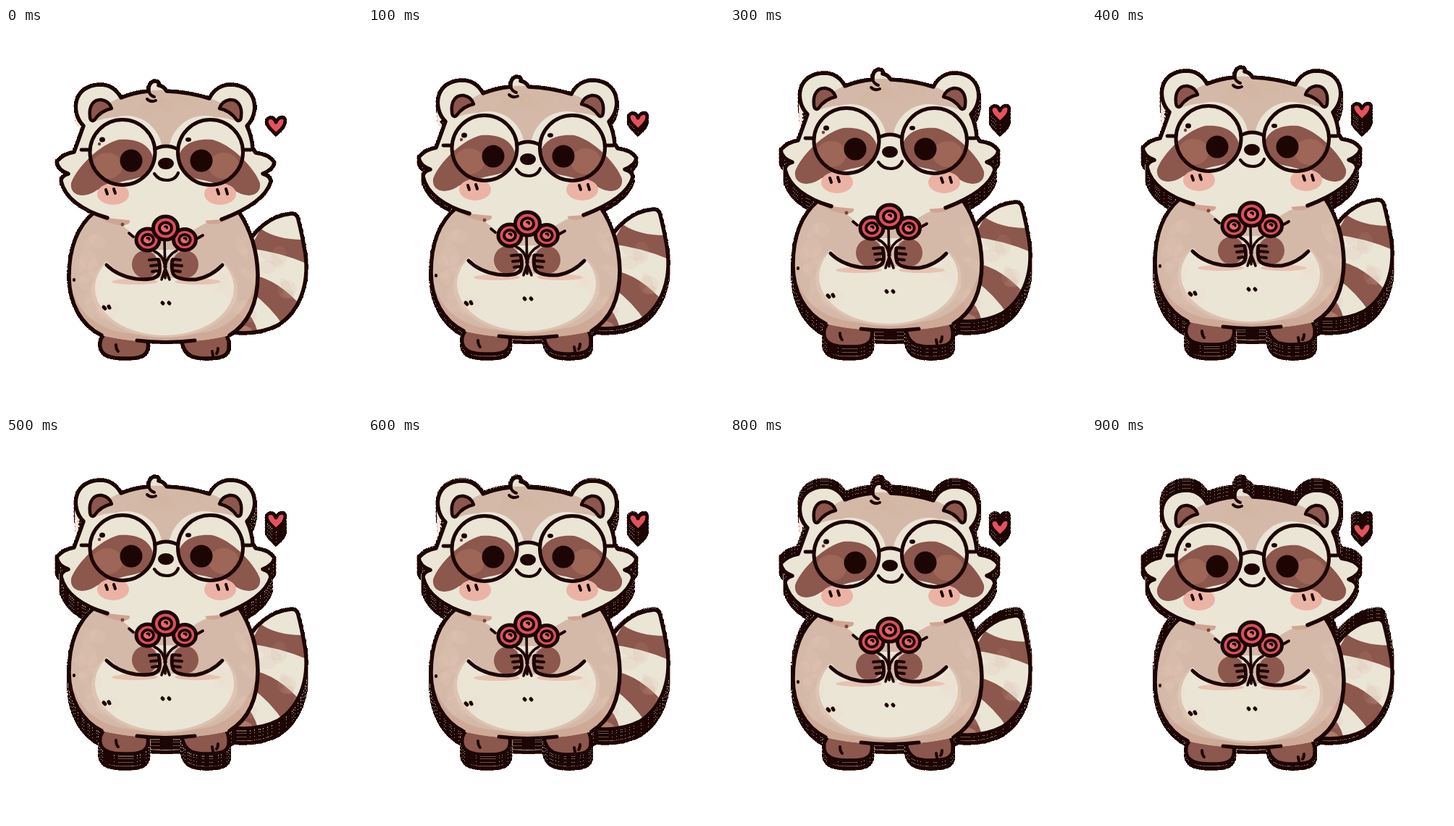
Write an HTML page with a canvas that moves like this. It is 492 px wide and 527 px high and loops after 1 s.

```html
<!DOCTYPE html>
<html lang="en">
<head>
<meta charset="utf-8">
<title>Raccoon with roses</title>
<style>
html, body { margin: 0; width: 100%; height: 100%; overflow: hidden; background: #fff; }
canvas { display: block; }
</style>
</head>
<body>
<canvas id="stage" width="492" height="527"></canvas>
<script>
const W = 492, H = 527;
const INK = '#1c0503', CREAM = '#ebe5d6', TAN = '#d5b9a8', BROWN = '#8c574c',
      LIGHT = '#9d6656', PINK = '#ebb3a4', RED = '#d9505b';

const sprite = document.createElement('canvas');
sprite.width = W;
sprite.height = H;
const g = sprite.getContext('2d', { willReadFrequently: true });
g.lineCap = g.lineJoin = 'round';

function shape(path, fill, line, width = 5) {
  const p = typeof path === 'string' ? new Path2D(path) : path;
  if (fill) { g.fillStyle = fill; g.fill(p); }
  if (line) { g.strokeStyle = line; g.lineWidth = width; g.stroke(p); }
}
const ink = (path, width = 4.5) => shape(path, null, INK, width);

function oval(x, y, rx, ry = rx, tilt = 0) {
  const p = new Path2D();
  p.ellipse(x, y, rx, ry, tilt, 0, Math.PI * 2);
  return p;
}

function within(path, draw) {
  g.save();
  g.clip(typeof path === 'string' ? new Path2D(path) : path);
  draw();
  g.restore();
}

function mirrored(draw) {
  draw();
  g.save();
  g.translate(441, 0);
  g.scale(-1, 1);
  draw();
  g.restore();
}

// Seeded generator for washes and the rough edge
let seed = 7;
function rnd() {
  seed = (seed * 16807) % 2147483647;
  return seed / 2147483647;
}

function wash(x, y, w, h, color, count) {
  g.globalAlpha = 0.12;
  for (let i = 0; i < count; i++) {
    shape(oval(x + rnd() * w, y + rnd() * h, 5 + rnd() * 14, 4 + rnd() * 9, rnd() * 3), color);
  }
  g.globalAlpha = 1;
}

function tail() {
  const p = 'M325 312 C340 282 362 259 394 256 Q402 255 404 264 Q409 284 412 301 C422 350 407 390 376 410 Q349 424 313 420 Z';
  shape(p, CREAM);
  within(p, () => {
    shape('M352 277 Q376 293 414 292 L420 327 Q383 310 337 304 Z', BROWN);
    shape('M338 340 Q376 346 412 388 L384 412 Q366 384 338 364 Z', BROWN);
    shape('M326 384 Q344 400 349 424 L306 424 Z', BROWN);
    shape(oval(318, 418, 22, 9), '#ac7c6d');
    wash(340, 270, 70, 140, '#c9a392', 8);
  });
  ink(p, 5.5);
}

function feet() {
  const left = 'M134 424 Q127 434 131 444 Q136 456 162 456 Q188 457 194 448 Q198 441 196 433';
  const right = 'M243 433 Q245 447 256 453 Q272 458 292 455 Q308 453 308 441 Q309 432 305 424';
  for (const p of [left, right]) shape(p, BROWN, INK, 5.5);
  ink('M152 437 Q152 443 155 446 M285 446 L286 452 M293 442 Q293 447 291 449', 4);
}

function body() {
  const p = 'M122 250 C98 272 87 305 87 343 C87 380 104 410 132 424 Q170 433 220 434 Q272 433 309 424 C335 408 348 380 348 340 C347 305 338 278 322 254 Z';
  shape(p, TAN);
  within(p, () => {
    shape('M87 340 C92 385 120 412 160 420 Q220 430 280 419 Q330 405 348 345 L350 440 L86 440 Z', '#cfa997');
    shape(oval(219, 361, 101, 66), '#dcc2b1');
    shape(oval(219, 359, 96, 65), CREAM);
    shape('M124 300 Q170 285 180 275 L260 275 Q285 290 312 302 Q300 330 270 345 L170 345 Q140 330 124 300', TAN);
    shape('M140 262 Q162 270 176 286 Q220 302 252 284 Q272 268 298 262 Z', CREAM);
    shape(oval(148, 261, 24, 9, 0.3), '#d0a493');
    shape(oval(295, 261, 20, 8, -0.3), '#d0a493');
    shape(oval(178, 350, 32, 4), '#e7c2b1');
    shape(oval(265, 350, 32, 4), '#e7c2b1');
    wash(95, 275, 50, 130, '#e9cfbf', 12);
    wash(295, 275, 45, 120, '#e9cfbf', 12);
  });
  ink('M122 254 C98 274 87 305 87 343 C87 380 104 410 132 424', 5.5);
  ink('M309 424 C335 408 348 380 348 340 C347 305 338 278 322 254', 5.5);
  ink('M181 431 Q220 436 261 431', 5);
}

function ear() {
  shape('M116 123 C114 106 122 98 132 99 Q143 101 146 111 Q131 114 122 127 Q117 130 116 123', BROWN, INK, 4.5);
}

function eyePatch() {
  const p = 'M204 182 C200 161 182 152 156 154 C130 160 98 192 90 214 C88 230 104 236 122 226 C140 214 170 211 188 205 Q204 197 204 182';
  shape(p, BROWN);
  within(p, () => within(oval(161, 171, 44), () => shape(oval(140, 190, 21, 18), LIGHT)));
}

function head() {
  const p = 'M140 262 C105 252 81 234 76 211 Q76 204 86 201 Q71 196 70 184 Q80 173 94 171 Q101 152 107 135 ' +
    'C89 117 92 79 130 78 C144 78 153 85 159 96 Q176 89 197 87 C196 80 200 73 206 73 Q213 74 211 79 Q218 80 222 87 ' +
    'Q252 88 281 97 C287 85 298 78 311 78 C348 79 351 118 333 135 Q340 150 341 166 L345 172 Q363 174 371 185 ' +
    'Q370 195 355 201 Q366 204 366 212 C360 233 335 250 298 264';
  shape(oval(99, 123, 4, 12), '#f4e8df');
  shape(p + ' Q220 272 140 262', CREAM);
  within(p, () => {
    shape('M119 131 Q130 107 158 96 Q180 86 200 86 L222 86 Q258 88 282 97 Q309 106 322 131 ' +
      'Q306 122 283 123 C257 125 238 141 234 164 L209 164 C205 142 187 125 161 123 Q136 122 119 131', TAN);
    mirrored(() => shape(oval(166, 171, 50), CREAM));
    wash(160, 92, 115, 20, '#c9a896', 7);
    mirrored(eyePatch);
  });
  for (const x of [148, 296]) shape(oval(x, 229, 22, 15), PINK);
  mirrored(ear);
  ink(p, 5.5);
  ink('M197 87 Q199 93 205 95 M195 98 Q200 103 207 100', 4);
}

function face() {
  shape(oval(173, 183, 15.5), INK);
  shape(oval(270, 183, 15.5), INK);
  shape(oval(221, 187, 11, 8), INK);
  ink('M205 201 Q211 210 222 210 Q234 210 238 200', 4.2);
  ink(oval(161, 171.5, 45), 5);
  ink(oval(282.5, 171.5, 45), 5);
  ink('M206 167 Q221 159 237 167 M104 168 L114 168 M328 168 L339 168', 4.8);
  ink('M138 223 L140 229 M149 222 L151 228 M292 223 L294 229 M304 222 L306 229', 4);
  shape(oval(133, 154, 4, 3.5), INK);
  shape(oval(129, 160, 2.2), '#7d3a34');
  shape(oval(252, 154, 4, 3), INK);
}

function rose(x, y, r) {
  shape(oval(x, y, r, r - 1), RED, INK, 5);
  shape(oval(x, y, r * 0.5, r * 0.45), '#e56a70', INK, 4);
  ink(`M${x - 1} ${y - 2} q4 -1 3 2`, 3);
}

function bouquet() {
  shape(oval(192, 326, 18, 19), BROWN);
  shape(oval(248, 326, 18, 19), BROWN);
  shape('M203 306 L237 306 L228 319 L219 312 L210 319 Z', CREAM);
  ink('M139 327 Q154 342 179 346 Q205 349 211 340 Q214 333 211 320', 5);
  ink('M299 327 Q284 343 262 347 Q236 348 231 339 Q228 330 230 320', 5);
  ink('M198 320 L210 319 M200 328 L211 327 M202 336 L210 335', 4);
  ink('M241 320 L231 319 M243 328 L231 327 M241 336 L232 335', 4);
  ink('M219 290 L220 345 M205 308 Q218 314 220 330 M236 307 Q222 314 220 330 M221 329 L215 347 M219 329 L226 347', 3.6);
  rose(196, 292, 16);
  rose(247, 292, 15.5);
  rose(220.5, 276, 17);
}

function marks() {
  ink('M216 379 L217 380 M225 379 L226 380 M135 385 L137 387 M142 384 L143 386', 5);
  ink('M87 347 L88 348 M94 347 L94 348', 4);
  ink('M170 283 L176 288 M265 290 L272 286', 3.8);
  shape(oval(161, 271, 2.5), '#83443a');
}

function heart() {
  shape('M373 147 C367 140 360 136 360 129 C361 122 370 121 373 130 C376 122 386 121 386 128 C386 136 379 141 373 147 Z', '#e5525c', INK, 5);
}

// Hard-edged silhouette with a speckled rim
function roughen() {
  const img = g.getImageData(0, 0, W, H), d = img.data;
  for (let i = 0; i < d.length; i += 4) {
    const a = d[i + 3];
    if (!a || a === 255) continue;
    const n = i / 4;
    d[i + 3] = a > 40 + rnd() * 110 ? 255 : 0;
    if ((n % W) % 2 && a < 200) {
      d[i] = 181;
      d[i + 1] = 154;
      d[i + 2] = 138;
    }
  }
  g.putImageData(img, 0, 0);
}

[tail, feet, body, head, face, bouquet, marks, heart, roughen].forEach(f => f());

const c = document.getElementById('stage').getContext('2d');
const start = performance.now();
const lift = step => Math.floor(20 * Math.sin(Math.PI * step / 10));
let shown = -1;

// Each step stays on the stage until the loop starts over
function draw(step) {
  c.clearRect(0, 0, W, H);
  for (let k = 0; k <= step; k++) c.drawImage(sprite, 0, -lift(k));
}

function tick(now) {
  const step = Math.floor((Math.max(0, now - start) % 1000) / 100);
  if (step !== shown) draw(shown = step);
  requestAnimationFrame(tick);
}
tick(start);
</script>
</body>
</html>
```
